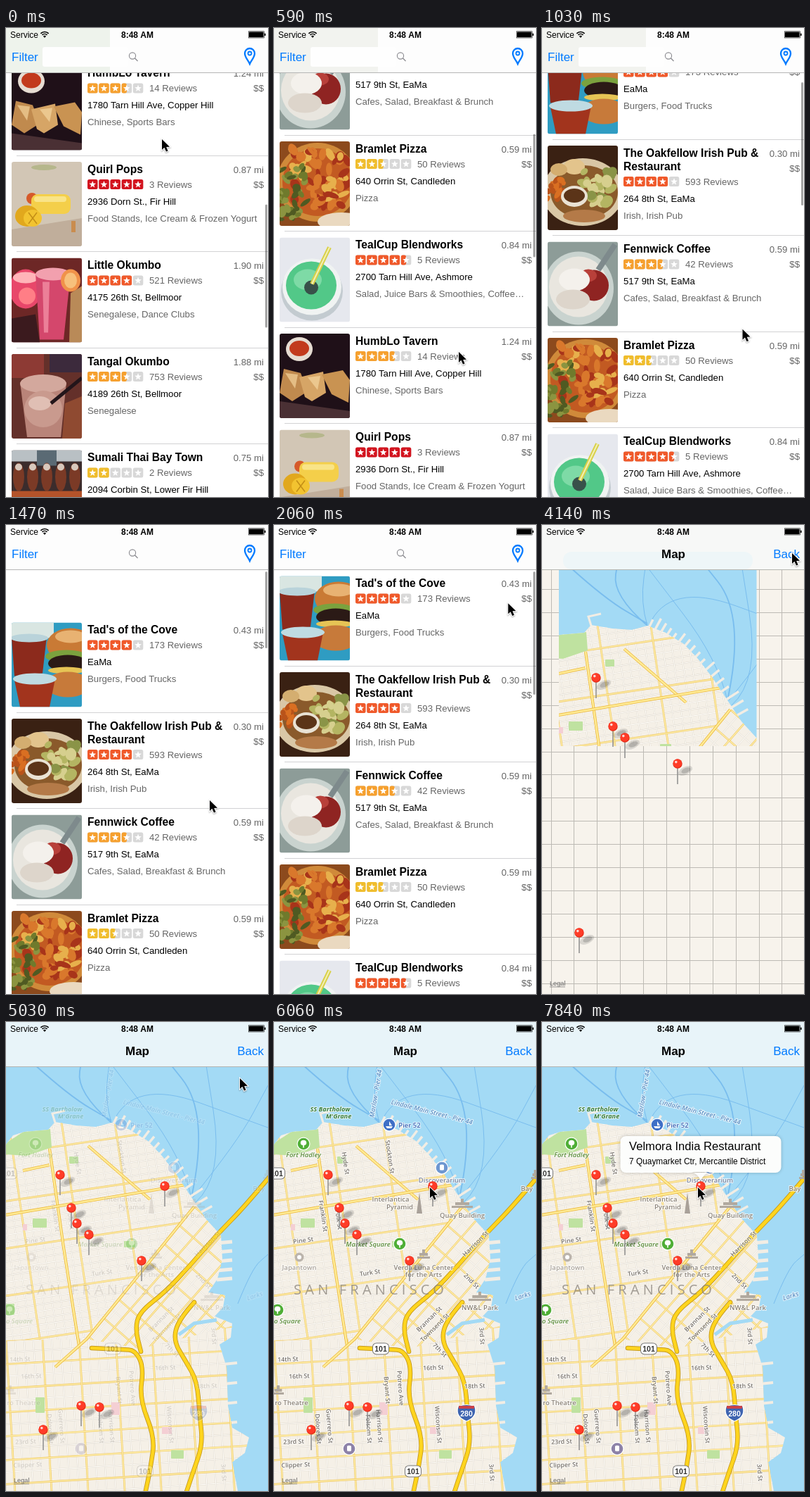
An HTML page with a canvas that plays this animation: 373 px wide and 666 px high, repeating every 7990 ms.

```html
<!DOCTYPE html>
<html lang="en">
<head>
<meta charset="utf-8">
<title>Places nearby</title>
<style>
html, body { margin: 0; width: 100%; height: 100%; overflow: hidden; background: #fff; }
canvas { display: block; width: 100%; height: 100%; }
</style>
</head>
<body>
<canvas id="stage" width="373" height="666"></canvas>
<script>
const W = 373, H = 666, LOOP = 7990, STEP = 147.2, ROW = 136.5;
const SANS = '"Liberation Sans", Arial, sans-serif';
const MAPFONT = '"Open Sans", "Noto Sans", sans-serif';
const BLUE = '#007aff';
const screen = document.getElementById('stage').getContext('2d');
let c = screen;

// ---- drawing helpers ----
function text(s, x, y, size, color, align = 'left', style = '') {
  c.font = `${style} ${size}px ${SANS}`;
  c.fillStyle = color;
  c.textAlign = align;
  c.fillText(s, x, y);
}
function rect(color, x, y, w, h, r = 0) {
  c.fillStyle = color;
  c.beginPath();
  c.roundRect(x, y, w, h, r);
  c.fill();
}
function oval(color, x, y, rx, ry = rx, turn = 0) {
  c.fillStyle = color;
  c.beginPath();
  c.ellipse(x, y, rx, ry, turn, 0, 7);
  c.fill();
}
function trace(pts) {
  c.beginPath();
  for (let i = 0; i < pts.length; i += 2) c.lineTo(pts[i], pts[i + 1]);
}
function poly(color, ...pts) {
  trace(pts);
  c.fillStyle = color;
  c.fill();
}
function line(color, width, ...pts) {
  trace(pts);
  c.strokeStyle = color;
  c.lineWidth = width;
  c.stroke();
}
function curve(pts) {
  const n = pts.length;
  c.beginPath();
  c.moveTo(pts[0], pts[1]);
  for (let i = 2; i < n - 2; i += 2)
    c.quadraticCurveTo(pts[i], pts[i + 1], (pts[i] + pts[i + 2]) / 2, (pts[i + 1] + pts[i + 3]) / 2);
  c.lineTo(pts[n - 2], pts[n - 1]);
}
function strokeTwice(edge, fill, wide, thin) {
  c.strokeStyle = edge; c.lineWidth = wide; c.stroke();
  c.strokeStyle = fill; c.lineWidth = thin; c.stroke();
}
function layer(paint) {
  const el = document.createElement('canvas');
  el.width = W; el.height = H;
  c = el.getContext('2d');
  paint();
  c = screen;
  return el;
}
function seeded(seed) {
  return () => (seed = (seed * 16807) % 2147483647) / 2147483647;
}
// Linear interpolation through [step, value...] keys.
function track(keys, k) {
  if (k <= keys[0][0]) return keys[0].slice(1);
  for (let i = 1; i < keys.length; i++) {
    const a = keys[i - 1], b = keys[i];
    if (k <= b[0]) {
      const f = (k - a[0]) / (b[0] - a[0]);
      return a.slice(1).map((v, j) => v + (b[j + 1] - v) * f);
    }
  }
  return keys[keys.length - 1].slice(1);
}

// ---- dishes, drawn in a 100 x 120 box ----
function specks(colors, n, x, y, w, h, size, seed) {
  const rnd = seeded(seed);
  for (let i = 0; i < n; i++)
    oval(colors[i % colors.length], x + rnd() * w, y + rnd() * h, size * (.5 + rnd()), size * (.4 + rnd() * .6), rnd() * 3);
}
const dishes = [
  () => { // burger
    rect('#2f9cc2', 0, 0, 100, 120);
    rect('#d9e6e2', 0, 0, 60, 22);
    oval('#c97a35', 84, 32, 34, 24); oval('#e8b272', 84, 20, 22, 9);
    oval('#7ba23e', 78, 48, 30, 9); oval('#2b1a16', 80, 58, 28, 12);
    oval('#e6c455', 78, 68, 26, 5); oval('#c77a3a', 80, 88, 32, 18);
    poly('#8c2a1c', 0, 22, 50, 20, 44, 72, 4, 76); oval('#b9d3da', 25, 22, 27, 6);
    poly('#a2341d', 4, 82, 62, 80, 54, 120, 12, 120); oval('#bfdbe2', 33, 80, 31, 8);
  },
  () => { // roast plate
    rect('#3a2113', 0, 0, 100, 120);
    oval('#d9c7a6', 50, 66, 58, 48); oval('#8a5a2b', 52, 66, 48, 38);
    oval('#e3c48c', 38, 30, 15, 11); oval('#d4ae70', 16, 34, 12, 9);
    specks(['#d96f22', '#b9531a'], 22, 0, 44, 30, 34, 6, 7);
    specks(['#b4b562', '#d6cf8e', '#8a9447'], 26, 52, 36, 40, 46, 8, 11);
    oval('#e9e2d4', 38, 72, 19, 15); oval('#5b3418', 38, 71, 15, 10);
    oval('#b47a48', 52, 100, 30, 9);
  },
  () => { // yogurt bowl
    rect('#8d9c98', 0, 0, 100, 120);
    oval('#c9d3cf', 44, 66, 50, 52); oval('#e9e6df', 44, 64, 42, 43);
    oval('#8f2422', 66, 62, 21, 22); oval('#b8403a', 58, 48, 12, 9);
    oval('#f4f1ec', 38, 54, 22, 16); oval('#ddd5cb', 36, 82, 24, 14);
    line('#7e8a8c', 8, 96, 4, 72, 40);
  },
  () => { // pizza
    rect('#8c4a1d', 0, 0, 100, 120);
    oval('#d08a3a', 54, 58, 58, 56); oval('#c25a22', 54, 58, 50, 48);
    specks(['#e7b04c', '#a8341a', '#d9782c'], 70, 18, 10, 80, 82, 7, 23);
    specks(['#6f7a2c', '#8b9440', '#4f5a22'], 44, -4, 34, 42, 80, 6, 31);
    oval('#ead9c0', 88, 114, 34, 13);
  },
  () => { // green smoothie
    rect('#e6e8ee', 0, 0, 100, 120);
    oval('#c3cbd0', 46, 76, 44, 42); oval('#f0f3f2', 46, 70, 42, 40);
    oval('#52c888', 45, 68, 36, 34); oval('#7edaa6', 40, 60, 20, 15);
    oval('#38514a', 45, 71, 10);
    line('#d8d048', 6, 46, 66, 71, 14); line('#f3efb4', 2, 46, 66, 71, 14);
  },
  () => { // fried dumplings
    rect('#1f1018', 0, 0, 100, 120);
    poly('#4a3034', 0, 96, 100, 110, 100, 120, 0, 120);
    oval('#e6dcd2', 28, 22, 19, 17); oval('#c23a1d', 28, 21, 14, 11);
    poly('#c08a4e', 0, 84, 6, 50, 30, 56, 40, 82, 18, 96);
    poly('#d6a566', 28, 62, 62, 54, 66, 84, 46, 96, 36, 90);
    poly('#c99352', 60, 58, 90, 52, 100, 66, 98, 98, 74, 86);
    poly('#e4bd84', 8, 56, 26, 58, 22, 78); poly('#ebc78e', 40, 62, 58, 60, 54, 80);
  },
  () => { // ice pop
    rect('#d2c6b5', 0, 0, 100, 120);
    poly('#c0ae9b', 0, 96, 100, 80, 100, 120, 0, 120);
    oval('#b6b78c', 46, 8, 18, 4);
    line('#c98c4e', 6, 88, 84, 88, 100);
    oval('#d65a2a', 29, 52, 8); rect('#f4cf4a', 28, 46, 56, 28, 9); rect('#f9e488', 32, 49, 46, 8, 4);
    oval('#e1a81d', 22, 77, 17, 15); oval('#f2c330', 30, 80, 13, 12);
    line('#c48f16', 1.5, 24, 72, 36, 88); line('#c48f16', 1.5, 36, 72, 24, 88);
  },
  () => { // pink drinks
    rect('#6d2726', 0, 0, 100, 120);
    poly('#b98a58', 84, 50, 100, 40, 100, 120, 82, 120);
    oval('#e8476a', 20, 44, 23, 28); oval('#ffb4b8', 20, 28, 18, 8); oval('#ff7e86', 22, 54, 12, 12);
    poly('#d4476c', 34, 22, 84, 22, 74, 116, 40, 116); oval('#f2a0ae', 59, 23, 25, 9);
    poly('#ec7f98', 44, 34, 54, 34, 52, 106, 46, 106);
    oval('#f0924a', 84, 32, 14, 16); oval('#f7c07c', 84, 32, 9, 11);
    poly('#3b1a1e', 0, 86, 34, 80, 40, 120, 0, 120);
  },
  () => { // milky drink
    rect('#64302a', 0, 0, 100, 120);
    rect('#8d3a34', 0, 0, 46, 34); rect('#3c2a3c', 54, 0, 46, 26);
    poly('#b98479', 12, 40, 78, 40, 70, 118, 22, 118);
    oval('#d3a89d', 45, 42, 33, 13); oval('#c99a8e', 45, 78, 27, 26); oval('#e0bfb4', 40, 70, 16, 10);
    line('#23151a', 5, 56, 70, 100, 34);
    poly('#8f4a31', 76, 70, 100, 60, 100, 120, 72, 120);
  },
  () => { // skewers
    rect('#3b2c2c', 0, 0, 100, 120);
    rect('#b9c0c4', 0, 0, 100, 16); rect('#5a6a74', 36, 0, 28, 22);
    for (let i = 0; i < 5; i++) {
      oval('#7b3a26', 10 + i * 20, 38, 8, 20); oval('#d8c8bc', 10 + i * 20, 24, 5, 5);
    }
    rect('#b4532a', 0, 58, 100, 62);
  }
];
const places = `Tad's of the Cove|4|173|EaMa|Burgers, Food Trucks|0.43
The Oakfellow Irish Pub &/Restaurant|4|593|264 8th St, EaMa|Irish, Irish Pub|0.30
Fennwick Coffee|3.5|42|517 9th St, EaMa|Cafes, Salad, Breakfast & Brunch|0.59
Bramlet Pizza|2.5|50|640 Orrin St, Candleden|Pizza|0.59
TealCup Blendworks|4.5|5|2700 Tarn Hill Ave, Ashmore|Salad, Juice Bars & Smoothies, Coffee…|0.84
HumbLo Tavern|3.5|14|1780 Tarn Hill Ave, Copper Hill|Chinese, Sports Bars|1.24
Quirl Pops|5|3|2936 Dorn St., Fir Hill|Food Stands, Ice Cream & Frozen Yogurt|0.87
Little Okumbo|4|521|4175 26th St, Bellmoor|Senegalese, Dance Clubs|1.90
Tangal Okumbo|3.5|753|4189 26th St, Bellmoor|Senegalese|1.88
Sumali Thai Bay Town|2|2|2094 Corbin St, Lower Fir Hill|Thai|0.75`.split('\n').map(s => s.split('|'));

function stars(rating, x, y) {
  const color = rating > 4.5 ? '#d3141f' : rating > 3.5 ? '#f0592a' : rating > 3 ? '#f6a02e' : '#f0bd2c';
  for (let i = 0; i < 5; i++) {
    const sx = x + i * 16.2, part = Math.max(0, Math.min(1, rating - i));
    rect('#d8d8d8', sx, y, 14.5, 14, 2.5);
    if (part) rect(color, sx, y, 14.5 * part, 14, 2.5);
    const pts = [];
    for (let j = 0; j < 10; j++) {
      const a = j * Math.PI / 5 - Math.PI / 2, r = j % 2 ? 2.1 : 5.2;
      pts.push(sx + 7.25 + r * Math.cos(a), y + 7.3 + r * Math.sin(a));
    }
    poly('#fff', ...pts);
  }
}
function drawRow(i, y) {
  const [name, rating, reviews, address, kinds, miles] = places[i];
  const lines = name.split('/');
  c.save();
  c.beginPath();
  c.roundRect(8, y + 8.5, 100, 120, 3);
  c.clip();
  c.translate(8, y + 8.5);
  dishes[i]();
  c.restore();
  lines.forEach((s, j) => text(s, 116, y + 24 + 19 * j, 15.6, '#000', 'left', 'bold'));
  text(miles + ' mi', 367, y + 24, 13.2, '#666', 'right');
  text('$$', 367, y + 45, 13.2, '#666', 'right');
  y += 19 * (lines.length - 1);
  stars(+rating, 116, y + 33.5);
  text(reviews + ' Reviews', 204, y + 45, 13.2, '#666');
  text(address, 116, y + 69, 13.2, '#000');
  text(kinds, 116, y + 93, 13.2, '#666');
}

// ---- bars ----
function statusBar() {
  text('Service', 6, 14, 12, '#000');
  c.lineCap = 'butt';
  c.strokeStyle = '#000';
  c.lineWidth = 1.7;
  for (const r of [8, 5]) {
    c.beginPath(); c.arc(55, 13.5, r, -2.35, -.79); c.stroke();
  }
  poly('#000', 55, 14, 52.9, 11.4, 55, 10.6, 57.1, 11.4);
  text('8:48 AM', 187, 14, 12, '#000', 'center', 'bold');
  c.strokeStyle = '#000'; c.lineWidth = .6;
  c.strokeRect(345.3, 4.8, 22, 9.2);
  rect('#000', 346, 5.5, 20.6, 7.8, 1);
  rect('#000', 368, 7.6, 1.6, 3.6, 1);
}
function listBar(k) {
  rect('#fdfdfd', 0, 0, W, 63.5);
  if (k < 9) {
    rect(k < 3 ? '#eef3ec' : '#f2f3ef', 0, 0, 148, 63);
    rect('#fefefe', 52, 27, 122, 28, 3);
  }
  rect('#b6b6b6', 0, 63, W, 1);
  text('Filter', 8, 47, 17, BLUE);
  c.strokeStyle = '#8a8a8f'; c.lineWidth = 1.1;
  c.beginPath(); c.arc(180, 39.5, 4.6, 0, 7); c.stroke();
  line('#8a8a8f', 1.3, 183.3, 42.8, 187.5, 47);
  c.globalAlpha = k === 17 || k === 18 ? .35 : 1;
  c.beginPath();
  c.arc(347, 36, 7, Math.PI, 0);
  c.bezierCurveTo(354, 42, 349.5, 45, 347, 51);
  c.bezierCurveTo(344.5, 45, 340, 42, 340, 36);
  c.strokeStyle = BLUE; c.lineWidth = 2.3; c.stroke();
  c.beginPath(); c.arc(347, 36, 2.5, 0, 7); c.lineWidth = 1.8; c.stroke();
  c.globalAlpha = 1;
}
function drawList(k) {
  const top = track(scrollKeys, k)[0];
  rect('#fff', 0, 0, W, H);
  for (let i = 0; i < places.length; i++) {
    const y = top + i * ROW;
    if (y > H || y < -ROW) continue;
    drawRow(i, y);
    rect('#d2d2d4', 15, Math.round(y + ROW) - 1, W - 15, 1);
  }
  if (k < 15) {
    const over = Math.max(0, top - 64);
    rect('rgba(0,0,0,.36)', 369, 66 + Math.max(0, 64 - top) / 3.8, 3, 175 - over, 1.5);
  }
  listBar(k);
}

// ---- map ----
const coast = [0, 174, 10, 161, 26, 156, 60, 153, 70, 142, 100, 147, 128, 149, 150, 143, 176, 153, 202, 169,
  222, 190, 242, 216, 264, 249, 284, 279, 306, 303, 308, 336, 301, 365, 288, 384, 312, 388, 309, 405, 297, 418,
  322, 428, 320, 448, 304, 458, 314, 490, 316, 545, 322, 576, 346, 590, 340, 612, 322, 625, 330, 666, 0, 666];
const north = [0, 120, 373, 120, 268, 262, 115, 450, 0, 452];
const soma = [268, 262, 380, 262, 330, 430, 190, 464, 115, 450];
const south = [0, 452, 115, 450, 190, 464, 330, 430, 380, 666, 0, 666];

// Streets of one district: small ones in white, every nth in yellow.
function streets(area, angle, dx, dy, nx, ny) {
  c.save();
  trace(area);
  c.clip();
  c.translate(area[0], area[1]);
  c.rotate(angle);
  for (const main of [false, true]) {
    for (let i = -60; i < 60; i++) {
      for (const [gap, n, upright] of [[dx, nx, true], [dy, ny, false]]) {
        if ((i % n === 0) !== main) continue;
        const p = i * gap;
        trace(upright ? [p, -600, p, 600] : [-600, p, 600, p]);
        if (main) strokeTwice('#efc45c', '#fff3b4', 2.6, 1.3);
        else strokeTwice('#dcd5ca', '#fffdf8', 1.9, 1.1);
      }
    }
  }
  c.restore();
}
function highway(...pts) {
  curve(pts);
  strokeTwice('#c69a1c', '#ffd51e', 6.5, 4.7);
}
const baseMap = layer(() => {
  rect('#a3daf5', 0, 0, W, H);
  const ferries = [[150, 143, 100, 100, 110, 40], [150, 143, 140, 110, 150, 40], [152, 143, 180, 80, 373, 150],
    [264, 249, 290, 130, 210, 30], [266, 249, 330, 170, 373, 90], [270, 256, 310, 220, 280, 30],
    [40, 60, 90, 105, 150, 140], [264, 249, 250, 190, 150, 60], [330, 400, 350, 350, 373, 330]];
  ferries.forEach((f, i) => { curve(f); c.strokeStyle = '#79bdee'; c.lineWidth = i % 3 ? 1 : 1.8; c.stroke(); });
  // piers
  for (let i = 0; i < 17; i++) {
    const f = i / 16, x = 152 + 126 * f, y = 146 + 124 * f - 17 * Math.sin(f * Math.PI), n = 13 + (i * 7) % 9;
    line('#f2ede4', 3.4, x, y, x + n * (.45 + f * .45), y - n * (.9 - f * .4));
  }
  for (let i = 0; i < 5; i++) line('#f2ede4', 5, 300, 314 + i * 13, 322, 312 + i * 13);
  for (let i = 0; i < 4; i++) line('#f2ede4', 4, 310, 486 + i * 28, 329, 484 + i * 28);
  line('#f2ede4', 3, 70, 143, 66, 130, 84, 126);
  trace(coast);
  c.fillStyle = '#f5f0e7';
  c.fill();
  c.save();
  c.clip();
  streets(north, -.145, 12.5, 9.5, 6, 7);
  streets(soma, -.85, 17, 14, 2, 2);
  streets(south, -.06, 13, 17, 4, 2);
  poly('#bfe2a0', 0, 172, 26, 155, 63, 152, 65, 178, 30, 190, 0, 188);
  for (const [x, y, w, h] of [[38, 279, 20, 13], [90, 191, 13, 10], [168, 311, 16, 9], [0, 400, 12, 16], [42, 533, 13, 22], [235, 608, 18, 12]])
    rect('#bfe2a0', x, y, w, h, 1);
  for (const [x, y, w, h] of [[24, 287, 6, 9], [150, 540, 12, 18], [222, 575, 14, 10]]) rect('#f4cfd4', x, y, w, h);
  for (const p of [[117, 176, 205, 252], [62, 180, 82, 320, 104, 460], [0, 274, 100, 257, 262, 230],
    [268, 262, 115, 450, 70, 490], [24, 211, 62, 203]]) {
    trace(p); strokeTwice('#ecb93f', '#ffeb94', 4.2, 2.5);
  }
  c.restore();
  line('#a3daf5', 5, 300, 423, 268, 428, 246, 444);
});
const roads = layer(() => {
  c.lineCap = c.lineJoin = 'round';
  highway(122, 463, 165, 465, 184, 466, 196, 490, 190, 535, 212, 590, 206, 632, 198, 670);
  highway(380, 214, 340, 262, 300, 302, 262, 346, 226, 384, 190, 412, 184, 436, 192, 468);
  highway(268, 398, 246, 422, 238, 452, 256, 482, 272, 510, 276, 560, 280, 600, 266, 640, 256, 670);
});

function label(s, x, y, size, color = '#7c766e', turn = 0, style = '600') {
  c.save();
  c.translate(x, y);
  c.rotate(turn);
  c.font = `${style} ${size}px ${MAPFONT}`;
  c.textAlign = 'center';
  c.lineJoin = 'round';
  c.strokeStyle = 'rgba(255,255,255,.75)';
  c.lineWidth = 2;
  c.strokeText(s, 0, 0);
  c.fillStyle = color;
  c.fillText(s, 0, 0);
  c.restore();
}
function badge(color, x, y, mark) {
  oval('#fff', x, y, 9.5);
  oval(color, x, y, 8.3);
  if (mark === 'tree') { oval('#fff', x, y - 1.5, 4.2, 3.8); rect('#fff', x - .8, y, 1.6, 5.5); }
  if (mark === 'boat') { poly('#fff', x, y - 5, x + 4, y + 1, x, y + 1); poly('#fff', x - 5, y + 2, x + 5, y + 2, x + 3, y + 5, x - 3, y + 5); }
  if (mark === 'box') rect('#fff', x - 3, y - 4.5, 6, 8, 1.5);
}
function shield(x, y) {
  rect('#777', x - 12, y - 8.5, 24, 17, 6);
  rect('#fff', x - 11, y - 7.5, 22, 15, 5);
  text('101', x, y + 4, 10.5, '#333', 'center', 'bold');
}
const labels = layer(() => {
  const green = '#5c8c3a', brown = '#8b8378', sea = '#5b8fc4', italic = 'italic 600';
  label('SS Bartholow', 80, 127, 9.2, '#3a7d3a', 0, 'italic 700');
  label("M'Grane", 92, 137, 9.2, '#3a7d3a', 0, 'italic 700');
  label('Fort Hadley', 42, 192, 9.5, green, 0, italic);
  label('Pier 52', 193, 150, 9.5, '#3c64b4');
  label('Lindale Main Street - Pier 44', 224, 131, 9.3, sea, .25, italic);
  label('Marlow - Pier 44', 148, 102, 9.3, sea, -1.4, italic);
  label('Discoverarium', 239, 228, 9.5, '#7d86a0');
  label('Interlantica', 166, 255, 9.5, brown);
  label('Pyramid', 179, 266, 9.5, brown);
  label('Quay Building', 268, 278, 9.5, brown);
  label('Market Square', 134, 319, 9.5, green, 0, italic);
  label('Verda Luna Center', 213, 352, 9.5, brown);
  label('for the Arts', 213, 362, 9.5, brown);
  label('NW&L Park', 293, 409, 9.5, brown);
  label('Japantown', 36, 352, 9.5, '#aaa39a');
  label('o Square', 19, 428, 9.5, green, 0, italic);
  label('ro Theatre', 25, 544, 9.5, brown);
  label('Bay', 360, 240, 9.5, brown);
  label('Larks', 355, 392, 9.3, sea, -.3, italic);
  for (const [s, x, y, turn] of [['Hyde St', 99, 201, 1.42], ['Franklin St', 67, 276, 1.42], ['Stockton St', 162, 192, 1.42],
    ['Pine St', 42, 313, -.14], ['Turk St', 137, 359, -.14], ['Polk St', 89, 281, 1.42], ['Harrison St', 289, 317, -.78],
    ['2nd St', 279, 370, .78], ['Brannan St', 223, 424, -.78], ['Townsend St', 231, 436, -.78], ['7th St', 234, 468, .78],
    ['14th St', 20, 482, -.04], ['16th St', 36, 506, -.04], ['16th St', 227, 494, -.04], ['18th St', 286, 520, -.04],
    ['23rd St', 28, 599, -.04], ['Clipper St', 31, 632, -.04], ['Dolores St', 60, 578, 1.5], ['Guerrero St', 76, 574, 1.5],
    ['Folsom St', 132, 578, 1.5], ['Harrison St', 147, 574, 1.5], ['Bryant St', 158, 523, 1.5], ['Potrero Ave', 177, 520, 1.5],
    ['Wisconsin St', 231, 572, 1.5], ['3rd St', 293, 446, 1.5], ['3rd St', 307, 640, 1.5]])
    label(s, x, y, 8.8, '#77716a', turn);
  c.font = `20px ${MAPFONT}`;
  c.letterSpacing = '5.2px';
  c.textAlign = 'right';
  c.fillStyle = 'rgba(140,134,126,.8)';
  c.fillText('SAN FRANCISCO', 247, 387);
  c.letterSpacing = '0px';
  badge('#4fae36', 42, 173, 'tree');
  badge('#4fae36', 179, 315, 'tree');
  badge('#4fae36', 5, 409, 'tree');
  badge('#3f6fc6', 164, 146, 'boat');
  badge('#6d96d0', 239, 207, 'box');
  badge('#8d82a8', 107, 606, 'box');
  oval('#bbb4ac', 36, 334, 6.5); oval('#fff', 36, 334, 3);
  poly('#a9a199', 207, 242, 211, 272, 203, 272);
  for (const [x, y, w] of [[268, 261, 30], [213, 333, 18], [293, 393, 32], [6, 526, 16], [372, 220, 12]]) {
    rect('#b1a99f', x - w / 2, y, w, 3);
    rect('#b1a99f', x - w / 3, y - 5, w / 1.5, 4);
    rect('#b1a99f', x - 2, y - 10, 4, 8);
  }
  shield(152, 464); shield(198, 638); shield(4, 215);
  c.beginPath();
  c.moveTo(262, 546);
  c.quadraticCurveTo(274, 541, 286, 546);
  c.bezierCurveTo(289, 556, 284, 563, 274, 567);
  c.bezierCurveTo(264, 563, 259, 556, 262, 546);
  c.fillStyle = '#3e64b0'; c.fill(); c.strokeStyle = '#fff'; c.lineWidth = 1.2; c.stroke();
  rect('#c8424a', 263, 545, 22, 4);
  text('280', 274, 560, 10.5, '#fff', 'center', 'bold');
});

function pin(x, y) {
  oval('rgba(60,60,60,.16)', x + 11, y + 10, 11, 5.5, -.45);
  oval('rgba(60,60,60,.22)', x + 12, y + 9.5, 7, 3.5, -.4);
  line('#8d8d8d', 1.5, x, y + 6, x, y + 29);
  oval('#e32a18', x, y, 6.7);
  oval('#ff3c28', x - .3, y - .4, 6);
  oval('rgba(255,255,255,.8)', x - 2.2, y - 2.4, 1.8);
}
const firstPins = [[77, 217], [101, 286], [118, 302], [193, 339], [53, 579]];
const latePins = [[93, 264], [226, 233], [107, 545], [133, 547]];

function callout(scale) {
  c.save();
  c.translate(226, 226);
  c.scale(scale, scale);
  c.translate(-226, -226);
  c.shadowColor = 'rgba(0,0,0,.22)';
  c.shadowBlur = 5;
  c.beginPath();
  c.roundRect(111.5, 162, 229, 52, 8);
  c.moveTo(213, 213);
  c.quadraticCurveTo(221, 215, 226, 225);
  c.quadraticCurveTo(231, 215, 239, 213);
  c.fillStyle = '#fcfdfc';
  c.fill();
  c.shadowColor = 'transparent';
  text('Velmora India Restaurant', 124, 182, 16.6, '#000');
  text('7 Quaymarket Ctr, Mercantile District', 124, 202, 11.9, '#000');
  c.restore();
}
function drawMap(k) {
  rect(k < 23 ? '#f0ead3' : '#f7f3ec', 0, 0, W, H);
  if (k >= 23) {
    for (let x = 12.5; x < W; x += 32.9) rect('#bdbab4', Math.round(x), 0, 1, H);
    for (let y = 58; y < H; y += 32.94) rect('#bdbab4', 0, Math.round(y), W, 1);
  }
  if (k >= 28) {
    c.save();
    if (k < 33) {
      c.beginPath();
      c.rect(24, 33, 281.5, k < 30 ? 281 : 562);
      c.clip();
    }
    c.drawImage(baseMap, 0, 0);
    if (k >= 30) c.drawImage(roads, 0, 0);
    c.globalAlpha = Math.max(0, Math.min(1, (k - 33) / 4));
    c.drawImage(labels, 0, 0);
    c.restore();
    const pins = k < 30 ? firstPins : firstPins.concat(latePins);
    pins.slice().sort((a, b) => a[1] - b[1]).forEach(p => pin(...p));
  }
  if (k >= 23) {
    text('Legal', 11, 654, 9.2, '#666');
    rect('#777', 11, 655.5, 22, .8);
  }
  if (k >= 52) callout(k === 52 ? 1.1 : 1);
  rect(k < 23 ? '#f7f6f1' : k < 33 ? '#f7f8f7' : '#e8f4f9', 0, 0, W, 64);
  if (k >= 28 && k < 33) rect('#eef6f8', 30, 38, 270, 25, 12);
  rect('#b5b5b0', 0, 63, W, 1);
  text('Map', 187, 47, 17, '#000', 'center', 'bold');
  text('Back', 367, 47, 17, BLUE, 'right');
}

// ---- timeline, in steps ----
const scrollKeys = [[0, -637.5], [1, -605], [4, -257], [7, 22], [9, 113], [10, 130], [11, 117], [12, 87], [13, 70], [14, 64]];
const cursorKeys = [[0, 222, 158], [1, 226, 185], [4, 263, 460], [6, 284, 440], [10, 290, 391], [12, 308, 250], [15, 346, 42],
  [20, 346, 42], [23, 356, 40], [32, 356, 40], [36, 310, 120], [41, 222, 235]];

function cursor(x, y) {
  c.save();
  c.translate(x, y);
  c.shadowColor = 'rgba(0,0,0,.35)';
  c.shadowBlur = 2;
  c.shadowOffsetY = 1;
  trace([0, 0, 0, 15, 3.4, 11.8, 6, 17.6, 8.6, 16.5, 6.2, 10.9, 11, 10.7]);
  c.closePath();
  c.strokeStyle = '#fff'; c.lineWidth = 2; c.stroke();
  c.shadowColor = 'transparent';
  c.fillStyle = '#000'; c.fill();
  c.restore();
}
function draw(t) {
  const k = Math.floor((t + 14) / STEP);
  // critically damped slide of the sheet
  const u = 4.74 + (k - 20) * 2.65;
  const drop = k < 19 ? H : Math.round(H * (1 + u) * Math.exp(-u));
  if (drop > 0) drawList(k);
  if (drop < H) {
    c.save();
    c.translate(0, drop);
    drawMap(k);
    c.restore();
  }
  statusBar();
  cursor(...track(cursorKeys, k));
}
function tick() {
  draw(performance.now() % LOOP);
  requestAnimationFrame(tick);
}
tick();
</script>
</body>
</html>
```
